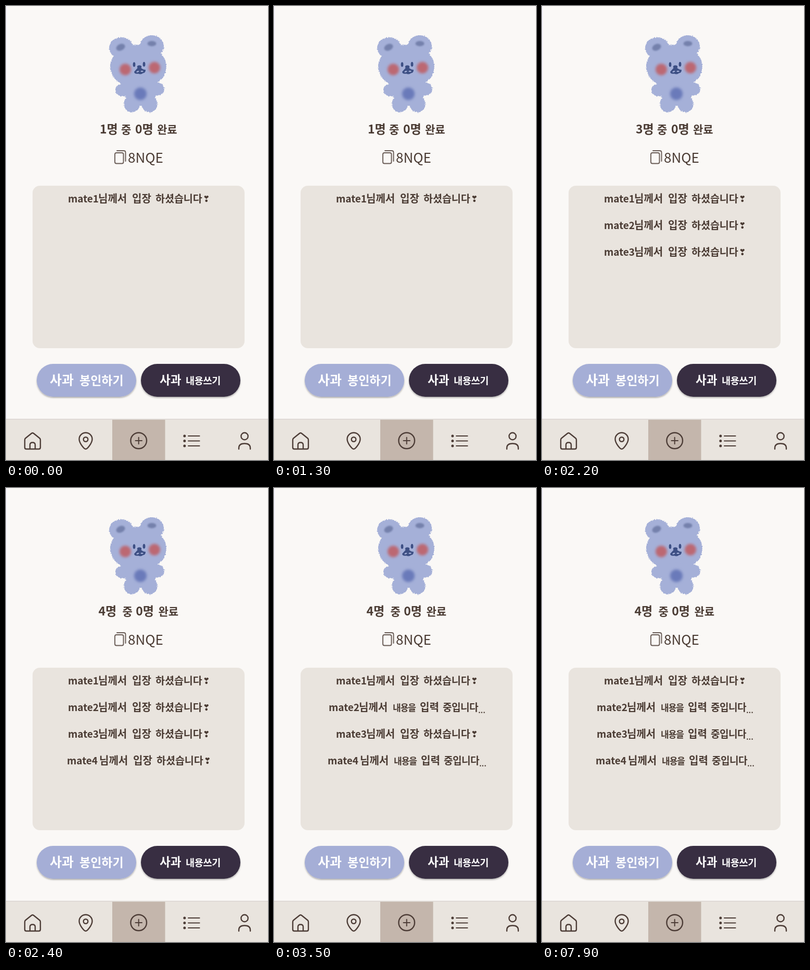
Recreate the animation shown at these times as an HTML page. Size 503 by 869 pixels, loop 8000 ms.

```html
<!DOCTYPE html>
<html lang="ko">
<head>
<meta charset="utf-8">
<title>Waiting room</title>
<style>
  html, body { margin: 0; width: 100%; height: 100%; overflow: hidden; background: #faf8f6; }
  svg { display: block; width: 503px; height: 869px; }
  text { font-family: "Noto Sans CJK KR", "Noto Sans CJK", "Noto Sans", sans-serif; font-weight: 700; fill: #4a3b33; }
  .mark { font-family: "DejaVu Sans", sans-serif; }
  .button text { fill: #fff; }
  .icons { fill: none; stroke: #4d3d37; stroke-width: 2.4; stroke-linecap: round; stroke-linejoin: round; }
</style>
</head>
<body>
<svg viewBox="0 0 503 869">
  <defs>
    <filter id="fur" x="-10%" y="-10%" width="120%" height="120%">
      <feTurbulence type="fractalNoise" baseFrequency=".45" numOctaves="2" seed="4"/>
      <feDisplacementMap in="SourceGraphic" scale="4" xChannelSelector="R" yChannelSelector="G"/>
    </filter>
    <filter id="soft" x="-50%" y="-50%" width="200%" height="200%"><feGaussianBlur stdDeviation="2.6"/></filter>
    <filter id="ears" x="-50%" y="-50%" width="200%" height="200%"><feGaussianBlur stdDeviation="1.7"/></filter>
    <filter id="shadow" x="-5%" y="-10%" width="110%" height="130%">
      <feDropShadow dx="0" dy="2" stdDeviation="1.5" flood-color="#000" flood-opacity=".3"/>
    </filter>
  </defs>

  <rect width="503" height="869" fill="#faf8f6"/>
  <rect width="2" height="791" fill="#f7f5fd"/>

  <g id="bear">
    <g fill="#a5b0d8" filter="url(#fur)">
      <ellipse cx="221" cy="80" rx="23" ry="20"/>
      <ellipse cx="280" cy="77" rx="23" ry="21"/>
      <ellipse cx="254" cy="116" rx="54" ry="42"/>
      <ellipse cx="224" cy="161" rx="14" ry="12"/>
      <ellipse cx="290" cy="159" rx="14" ry="12.5"/>
      <ellipse cx="258" cy="167" rx="30" ry="25"/>
      <ellipse cx="242" cy="187" rx="15.5" ry="16.5" transform="rotate(15 242 187)"/>
      <ellipse cx="275" cy="187" rx="15.5" ry="16.5" transform="rotate(-15 275 187)"/>
    </g>
    <g fill="#7581ac" filter="url(#ears)">
      <ellipse cx="220" cy="79" rx="9" ry="6" transform="rotate(-25 220 79)"/>
      <ellipse cx="280" cy="72" rx="8.5" ry="5"/>
    </g>
    <g filter="url(#soft)">
      <circle cx="229" cy="121.5" r="11" fill="#bc6872"/>
      <circle cx="285" cy="118" r="11" fill="#bc6872"/>
      <circle cx="258" cy="168" r="12" fill="#6a7aba"/>
    </g>
    <g fill="#3d4f84">
      <ellipse cx="246" cy="112" rx="2.4" ry="4.6"/>
      <ellipse cx="265" cy="111.5" rx="2.4" ry="4.6"/>
      <ellipse cx="256" cy="116.5" rx="4.2" ry="3"/>
      <path d="M254 117L246 126Q247 131 254 129.5Q259 132 263 128.5Q268 128 268 122Q262 122 258 117Z"/>
    </g>
    <g fill="#a5b0d8">
      <ellipse cx="253" cy="125.5" rx="2.7" ry="1.2" transform="rotate(-20 253 125.5)"/>
      <ellipse cx="261" cy="125" rx="2.6" ry="1.2"/>
    </g>
  </g>

  <text id="count" y="244"></text>

  <g fill="none" stroke="#685b55" stroke-width="1.9" stroke-linecap="round">
    <rect x="209" y="281" width="16.5" height="20.5" rx="3"/>
    <path d="M213 277H226Q229.5 277 229.5 280.500V297"/>
  </g>
  <text x="234" y="300" font-size="26" style="font-weight:500">8NQE</text>

  <rect x="51" y="344" width="407" height="311" rx="14" fill="#e9e4de"/>
  <g id="rows"></g>

  <g class="button">
    <rect x="59" y="685" width="191" height="63" rx="31.500" fill="#a5aed6" filter="url(#shadow)"/>
    <text id="seal" y="725"></text>
    <rect x="259" y="685" width="191" height="63" rx="31.500" fill="#372f42" filter="url(#shadow)"/>
    <text id="write" y="724"></text>
  </g>

  <rect y="790" width="503" height="2" fill="#dfdad6"/>
  <rect y="792" width="503" height="77" fill="#e9e4de"/>
  <rect x="204" y="792" width="101.500" height="77" fill="#c4b6ac"/>
  <g class="icons">
    <path d="M36 830.500Q36 828.500 37.500 827.300L49 818Q51 816.500 53 818L64.500 827.300Q66 828.500 66 830.500V845Q66 848 63 848H39Q36 848 36 845ZM46 848V840Q46 835.500 51 835.500T56 840V848"/>
    <path d="M153 848Q150.500 848 146 842Q140.500 834.500 140.500 829A12.500 12.200 0 0 1 165.500 829Q165.500 834.500 160 842Q155.500 848 153 848Z"/>
    <circle cx="153" cy="829.500" r="4.300"/>
    <circle cx="254.700" cy="832" r="15.300"/>
    <path d="M248.500 832H261M254.700 825.700V838.300" stroke-width="2"/>
    <path d="M350 823H371.500M350 832.500H371.500M350 842H371.500" stroke-width="2.100"/>
    <path d="M342.800 823h.01M342.800 832.500h.01M342.800 842h.01" stroke-width="5"/>
    <circle cx="458" cy="823.500" r="6.700"/>
    <path d="M447 848V846Q447 837.500 458 837.500T469 846V848"/>
  </g>
</svg>
<script>
const LOOP = 8000;
const members = [
  { name: "mate1", joins: 0, writes: Infinity },
  { name: "mate2", joins: 1600, writes: 3300 },
  { name: "mate3", joins: 2200, writes: 7900 },
  { name: "mate4", joins: 2400, writes: 3500 }
];
const byId = id => document.getElementById(id);

const word = (text, x, size, spacing = 0, extra = "") =>
  `<tspan x="${x}" font-size="${size}" letter-spacing="${spacing}" ${extra}>${text}</tspan>`;

const joined = dx => word("입장", 242 + dx, 20) +
  word("하셨습니다", 287 + dx, 19.5) +
  word("❣", 378 + dx, 16, 0, 'class="mark" dy="-1"');

const writing = dx => word("내용을", 228 + dx, 17, -1) +
  word("입력", 280 + dx, 20) +
  word("중입니다", 324 + dx, 19, -0.5) +
  word("...", 392 + dx, 14, 0, 'dy="4"');

function row({ name, writes }, index, time) {
  const isWriting = time >= writes;
  const dx = index === 3 ? 2 : 0;
  const start = isWriting ? 105 : 119;
  return `<text y="${376 + 51 * index}">` +
    word(name, start - dx, 19) +
    word("님께서", start + 58 + dx, 20) +
    (isWriting ? writing : joined)(dx) + "</text>";
}

function heading(total) {
  const dx = total === 4 ? 2.5 : 0;
  return word(`${total}명`, 180 - dx, 23) + word("중", 221 + dx, 21) +
    word("0명", 248 + dx / 2, 23) + word("완료", 290 + dx, 21);
}

byId("seal").innerHTML = word("사과", 84, 25) + word("봉인하기", 141, 23);
byId("write").innerHTML = word("사과", 295, 22.5) + word("내용쓰기", 345, 18.5, -0.3);

let shown = "";
function render(time) {
  const present = members.filter(m => time >= m.joins);
  const rows = present.map((m, i) => row(m, i, time)).join("");
  if (rows === shown) return;
  shown = rows;
  byId("rows").innerHTML = rows;
  byId("count").innerHTML = heading(present.length);
}

const begin = performance.now();
function tick() {
  render((performance.now() - begin) % LOOP);
  requestAnimationFrame(tick);
}
tick();
</script>
</body>
</html>
```
